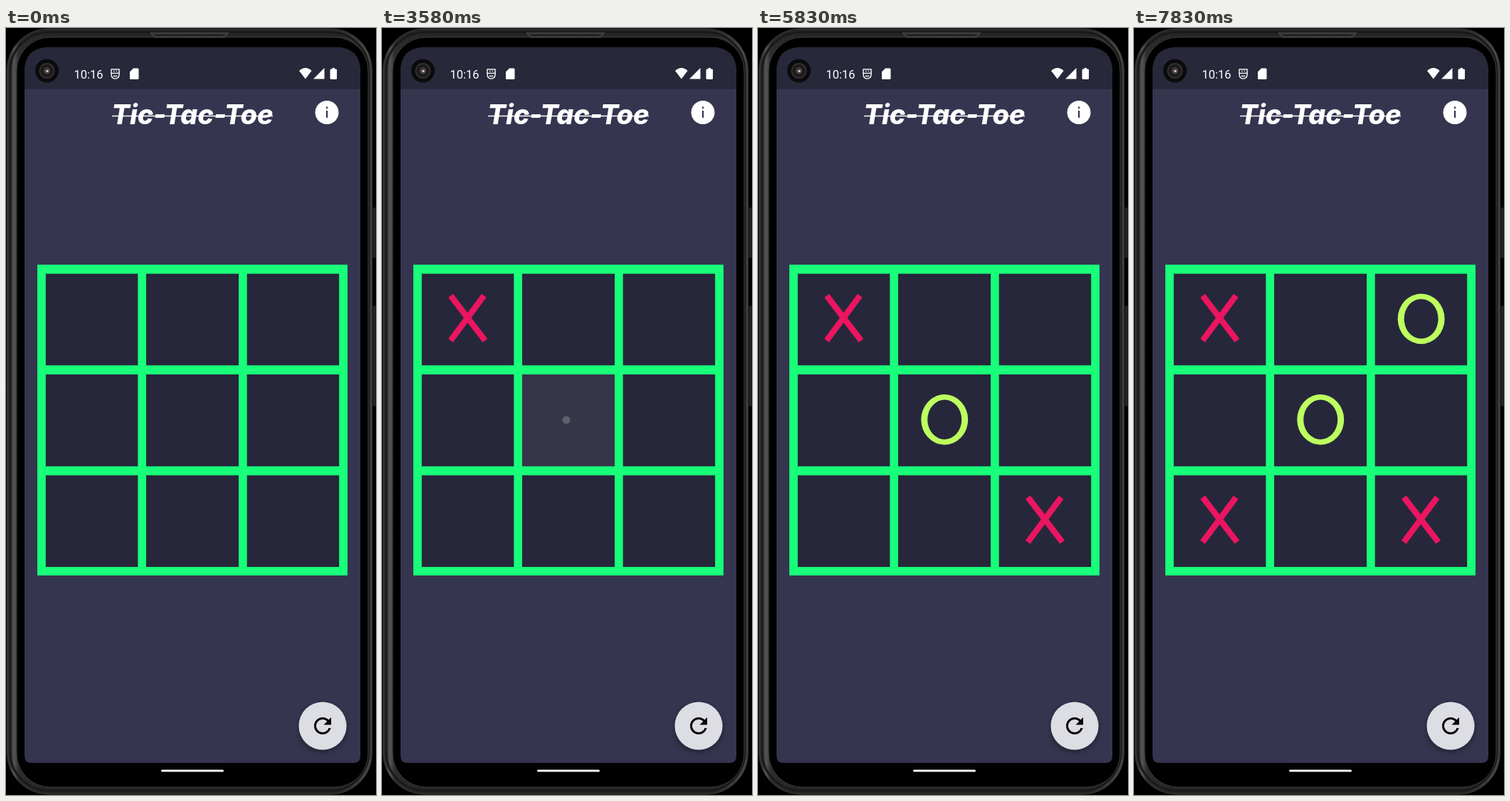
Recreate the animation shown at these times as an HTML page. Size 520 by 1076 pixels, loop 8000 ms.

```html
<!DOCTYPE html>
<html lang="en">
<head>
<meta charset="utf-8">
<title>Tic-Tac-Toe</title>
<style>
  html, body { margin: 0; width: 100%; height: 100%; overflow: hidden; background: #000; }
  svg { display: block; }
  #stage { width: 100vw; height: 100vh; }
  .title { font: italic 800 38px Inter, sans-serif; font-feature-settings: "cv11"; }
  .clock { font: 400 16.5px Roboto, sans-serif; }
</style>
</head>
<body>
<svg id="stage" viewBox="0 0 520 1076" xmlns="http://www.w3.org/2000/svg">
  <defs>
    <linearGradient id="rim" gradientUnits="userSpaceOnUse" x1="0" y1="0" x2="520" y2="0">
      <stop offset="0" stop-color="#3c3c3c"/>
      <stop offset=".01" stop-color="#2a2a2a"/>
      <stop offset=".022" stop-color="#565656"/>
      <stop offset=".034" stop-color="#2c2c2c"/>
      <stop offset=".1" stop-color="#262626"/>
      <stop offset=".9" stop-color="#262626"/>
      <stop offset=".98" stop-color="#4a4a4a"/>
      <stop offset="1" stop-color="#222"/>
    </linearGradient>
    <filter id="shadow" x="-30%" y="-30%" width="160%" height="170%">
      <feDropShadow dx="0" dy="3" stdDeviation="4" flood-opacity=".4"/>
    </filter>
  </defs>

  <!-- phone body -->
  <rect width="520" height="1076"/>
  <path d="M517.5 252v70M517.5 390v140" stroke="#242424" stroke-width="4"/>
  <rect x="1.5" y="1" width="513" height="1074" rx="58" fill="url(#rim)" stroke="#363636"/>
  <rect x="6" y="6" width="504" height="1064" rx="54" fill="none" stroke="#1a1a1a" stroke-width="3"/>
  <rect x="15" y="13" width="494" height="1052" rx="47" stroke="#3c3c3c"/>
  <path d="M203 7h110l-6 6h-98z" fill="#303030" stroke="#555"/>
  <path d="M211 10h94" stroke="#171717" stroke-width="2" stroke-dasharray="2 1"/>

  <!-- screen -->
  <path d="M26 1020V62Q26 27 61 27H463Q498 27 498 62V1020Q498 1031 490 1031H34Q26 1031 26 1020z" fill="#353550"/>
  <path d="M26 86V62Q26 27 61 27H463Q498 27 498 62V86z" fill="#28283b"/>
  <rect x="218" y="1040.5" width="88" height="3" rx="1.5" fill="#f2f2f2"/>

  <!-- camera -->
  <circle cx="57.5" cy="60" r="16.5" fill="#0b0b0d"/>
  <circle cx="57.5" cy="60" r="10" fill="#1b1919" stroke="#333032" stroke-width="2"/>
  <circle cx="57.5" cy="60" r="5" fill="#443a3a"/>
  <circle cx="58" cy="60.5" r="1.8" fill="#d9c5c0"/>

  <!-- status bar -->
  <g fill="#fff">
    <text class="clock" x="95.5" y="70.5">10:16</text>
    <path d="M148 58h11v7q0 6-5.5 6t-5.5-6zM147 63.5h13M150.5 67.5h6M151 60.5h1.5m2 0h1.5" fill="none" stroke="#eee" stroke-width="1.5"/>
    <path d="M179 56.5h6q1.5 0 1.5 1.5v12.5q0 1.5-1.5 1.5h-9.500q-1.5 0-1.5-1.5V61.5z"/>
    <path d="M412 60q8.7-8 17.5 0l-8.75 11.5z"/>
    <path d="M432 71.5 447.5 56v15.5z"/>
    <path d="M458.5 56h3.5v1.5h1.5q1.5 0 1.5 1.5v11.5q0 1.5-1.5 1.5h-6.5q-1.5 0-1.5-1.5V59q0-1.5 1.5-1.5h1.5z"/>
  </g>

  <!-- app bar -->
  <text class="title" x="262" y="135" text-anchor="middle" fill="#fff">Tic-Tac-Toe</text>
  <path d="M149 123.5H375" stroke="#fff" stroke-width="1.5"/>
  <circle cx="451" cy="118.5" r="16.5" fill="#fff"/>
  <path d="M451 110.5v2.5M451 116v10" stroke="#353550" stroke-width="2.2"/>

  <!-- board -->
  <rect x="44" y="332" width="436" height="436" fill="#18ff79"/>
  <g id="board"></g>

  <!-- restart button -->
  <circle cx="445" cy="979" r="33.5" fill="#dddde4" filter="url(#shadow)"/>
  <path transform="translate(427 961) scale(1.5)" d="M17.65 6.35C16.2 4.9 14.21 4 12 4c-4.42 0-7.99 3.58-7.99 8s3.57 8 7.99 8c3.73 0 6.84-2.55 7.73-6h-2.08c-.82 2.33-3.04 4-5.65 4-3.31 0-6-2.69-6-6s2.69-6 6-6c1.66 0 3.14.69 4.22 1.78L13 11h7V4z"/>
</svg>
<script>
const LOOP = 8000, FPS = 12, PITCH = 141.4, WIDTH = 130, HEIGHT = 129;

const glyphs = {
  X: { d: 'M41 31.1 89.3 94M87.7 31.1 40.8 94', stroke: '#eb1560', 'stroke-width': 8.4 },
  // Outer and inner ovals give slightly heavier sides.
  O: {
    d: 'M32.2 63.5a33 35.3 0 0 1 66 0a33 35.3 0 0 1-66 0zM41.2 63.5a24 27.8 0 0 1 48 0a24 27.8 0 0 1-48 0z',
    fill: '#bdff5f', 'fill-rule': 'evenodd'
  }
};

// Taps in ticks of 1/12 s: press begins at `start`, its ink is gone at `end`.
const taps = [
  { cell: 0, mark: 'X', start: 24, end: 28, x: 52.5, y: 61.5 },
  { cell: 4, mark: 'O', start: 43, end: 46, x: 62, y: 64 },
  { cell: 8, mark: 'X', start: 56, end: 60, x: 62, y: 64 },
  { cell: 2, mark: 'O', start: 75, end: 80, x: 62, y: 64 },
  { cell: 6, mark: 'X', start: 89, end: 94, x: 62, y: 64 }
];

function set(node, attrs) {
  for (const key in attrs) node.setAttribute(key, attrs[key]);
}

function add(parent, tag, attrs) {
  const node = document.createElementNS('http://www.w3.org/2000/svg', tag);
  set(node, attrs);
  return parent.appendChild(node);
}

const board = document.getElementById('board');
const cells = Array.from({ length: 9 }, (_, i) => {
  const cell = add(board, 'svg', {
    x: 55.6 + PITCH * (i % 3), y: 344.5 + PITCH * Math.floor(i / 3),
    width: WIDTH, height: HEIGHT
  });
  add(cell, 'rect', { width: WIDTH, height: HEIGHT, fill: '#26273b' });
  return cell;
});

for (const tap of taps) {
  const cell = cells[tap.cell];
  tap.highlight = add(cell, 'rect', { width: WIDTH, height: HEIGHT, fill: '#ccc' });
  tap.splash = add(cell, 'circle', { cx: tap.x, cy: tap.y, fill: '#ccc' });
  tap.glyph = add(cell, 'path', glyphs[tap.mark]);
}

function ink(age, left) {
  if (age < 0 || left <= 0) return { highlight: 0, splash: 0, radius: 0 };
  if (left === 1) return { highlight: 0.09, splash: 0, radius: 0 };
  if (left === 2) return { highlight: 0.16, splash: 0.12, radius: 60 };
  return { highlight: Math.min(0.25, 0.09 + 0.08 * age), splash: 0.27, radius: 5.5 + 8 * age };
}

function draw(time) {
  // Small lead keeps ticks aligned with times rounded to 10 ms.
  const tick = Math.floor((time + 5) * FPS / 1000);
  for (const tap of taps) {
    const { highlight, splash, radius } = ink(tick - tap.start, tap.end - tick);
    set(tap.highlight, { opacity: highlight });
    set(tap.splash, { opacity: splash, r: radius });
    set(tap.glyph, { visibility: tick >= tap.end - 2 ? 'visible' : 'hidden' });
  }
}

function loop() {
  draw(performance.now() % LOOP);
  requestAnimationFrame(loop);
}
loop();
</script>
</body>
</html>
```
